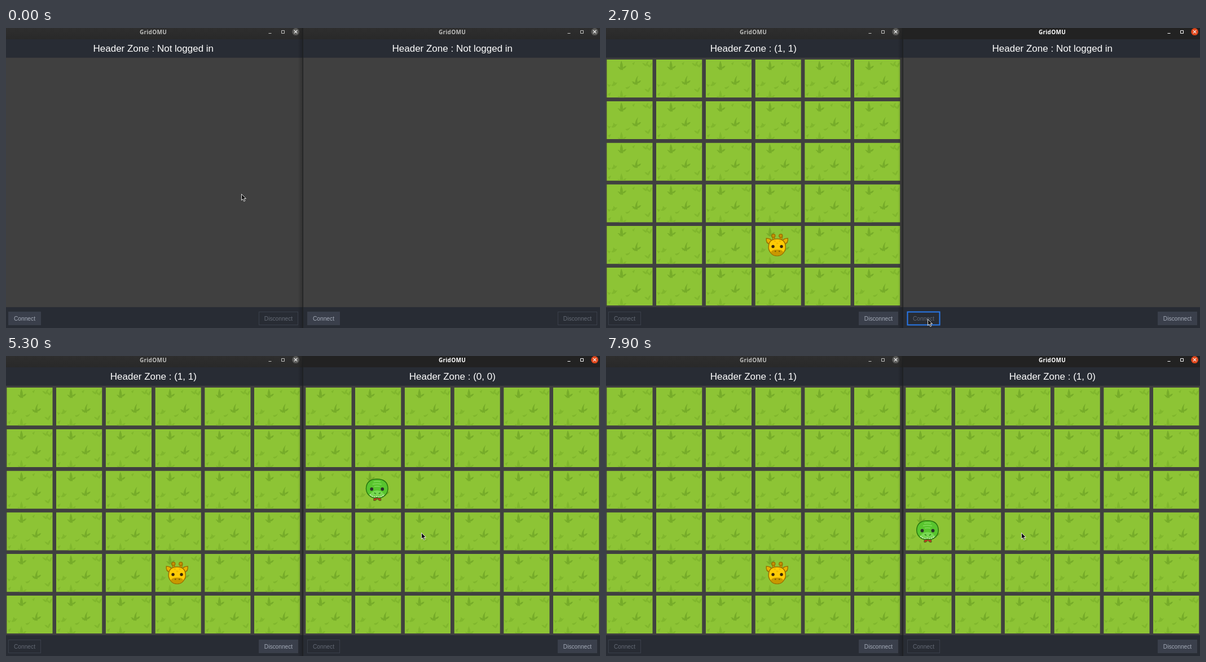
Write an HTML page that moves like this. It is 1053x532 px and loops after 8000 ms.

```html
<!DOCTYPE html>
<html lang="en">
<head>
<meta charset="utf-8">
<title>Two game windows</title>
<style>
html, body { margin: 0; width: 100%; height: 100%; overflow: hidden; background: #404040; }
svg { display: block; }
text { text-anchor: middle; font-family: "Liberation Sans", Arial, sans-serif; }
.bar { fill: url(#idleBar); }
.title { font: bold 10px "Open Sans", "Noto Sans", sans-serif; letter-spacing: .3px; fill: #bcbcba; }
.ctl { fill: none; stroke: #c4c4c2; }
.close { fill: #5a5a58; }
.cross { fill: none; stroke: #eee; stroke-width: 1.3; }
.focused .bar { fill: #222; }
.focused .title { fill: #fff; }
.focused .ctl { stroke: #fff; }
.focused .close { fill: #e3481c; }
.zone { font-size: 17px; fill: #fff; }
.panel { fill: #282c34; }
.btn rect { fill: #282c34; stroke: #3a3f4a; }
.btn text { font-size: 10.2px; fill: #646a75; }
.btn.on rect { fill: #3a3f4b; }
.btn.on text { fill: #a3aab7; }
.btn.ring rect { stroke: #2878ea; stroke-width: 2; }
</style>
</head>
<body>
<svg id="stage" width="1053" height="532" viewBox="0 0 1053 532">
  <defs>
    <linearGradient id="idleBar" x2="0" y2="1">
      <stop stop-color="#2e2e2e"/><stop offset="1" stop-color="#292929"/>
    </linearGradient>
    <linearGradient id="shade">
      <stop stop-opacity="0"/><stop offset="1" stop-opacity=".22"/>
    </linearGradient>
    <path id="tuft" d="M-8 2Q-4 1-3 4Q-4-2-1-9Q2-3 2 3Q4 0 8 0Q6 5 2 5Q3 7 1 8Q0 6-2 8Q-3 5-5 6Q-4 4-8 2Z"/>
    <path id="bend" d="M-8 2Q-4 1-2 4Q-1-4 4-9Q1-2 3 3Q5 0 9 0Q7 5 3 5Q3 8 1 8Q0 6-2 8Q-3 5-6 6Q-4 4-8 2Z"/>
    <path id="blade" d="M-5-1Q0-1 1 2Q2-3 6-4Q5 2 2 5Q-2 4-5-1Z"/>
    <symbol id="tile" viewBox="0 0 81.3 67.3">
      <rect width="82" height="68" fill="#8dc435"/>
      <g fill="#80b72d">
        <use href="#blade" x="68" y="7"/>
        <use href="#blade" x="75" y="9"/>
        <use href="#blade" x="72" y="53"/>
        <use href="#tuft" x="27" y="63"/>
        <path d="M8 46Q12 43 12 38Q16 43 19 40Q17 46 11 47ZM1 43Q5 46 8 44L4 49ZM33 49Q38 50 42 46Q40 52 35 52ZM45 7L50 4L48 10ZM2 61L8 58L5 65Z"/>
      </g>
      <use href="#tuft" x="27" y="11" fill="#76ac29"/>
      <use href="#bend" x="52" y="37" fill="#76ac29"/>
    </symbol>
    <g id="giraffe" stroke="#9b7200" stroke-width="1.5">
      <path d="M15 13L13 4M26 13L28 4" stroke-width="4.5"/>
      <path d="M15 13L13 4M26 13L28 4" stroke="#d9a400" stroke-width="2"/>
      <circle cx="13.5" cy="3.5" r="3" fill="#c99300"/>
      <circle cx="26.5" cy="3.5" r="3" fill="#c99300"/>
      <path d="M7 18Q0 17 1 8Q9 8 12 14ZM33 18Q40 17 39 8Q31 8 28 14Z" fill="#e8b100"/>
      <path d="M20 9Q34 9 35 22Q36 28 31 34Q27 39 20 39Q13 39 9 34Q4 28 5 22Q6 9 20 9Z" fill="#ffcb05"/>
      <g stroke="none">
        <path d="M13 12L18 11L17 15ZM23 11L28 13L24 15ZM19 15L23 17L19 19Z" fill="#f0b800"/>
        <path d="M20 28Q30 28 31 33Q27 38.3 20 38.3Q13 38.3 9 33Q10 28 20 28Z" fill="#c99700"/>
        <circle cx="12.8" cy="22.5" r="2.7" fill="#38270a"/>
        <circle cx="27.8" cy="22.5" r="2.7" fill="#38270a"/>
        <circle cx="17" cy="31" r="1.2" fill="#7d5b00"/>
        <circle cx="24" cy="31" r="1.2" fill="#7d5b00"/>
      </g>
    </g>
    <g id="snake">
      <path d="M17 31V34L14 35V39H17L20.5 36L24 39H27V35L24 34V31Z" fill="#b83b22" stroke="#4c6d18"/>
      <path d="M20 .8Q39 1 39.3 18Q39 27 31 32Q26 35 20 33.5Q14 35 9 32Q1 27 .7 18Q1 1 20 .8Z" fill="#58c52e" stroke="#28760f" stroke-width="1.5"/>
      <path d="M14 5.5Q20 4 26 5.5M12 10Q20 8 28 10M15 14Q20 13 25 14" fill="none" stroke="#80dc59" stroke-width="1.7"/>
      <path d="M20 21Q28 21 33 28Q27 32 20 30Q13 32 7 28Q12 21 20 21Z" fill="#79d954"/>
      <path d="M7 28Q13 34 20 31.5Q27 34 33 28" fill="none" stroke="#d7f1c5" stroke-width="1.6" stroke-dasharray="3 1"/>
      <circle cx="10.5" cy="18.5" r="2.9" fill="#293229"/>
      <circle cx="29.5" cy="18.5" r="2.9" fill="#293229"/>
      <path d="M15 25L18 27M26 25L23 27" stroke="#34891b" stroke-width="1.6"/>
    </g>
  </defs>
  <rect width="1053" height="532" fill="#404040"/>
  <g id="windows"></g>
  <rect x="517" width="9" height="532" fill="url(#shade)"/>
  <rect x="525.7" width="1.2" height="532" fill="#1d1e20"/>
  <path id="cursor" d="M.5.5V11.5L3 9.2L4.8 13.4L6.8 12.5L5 8.5H8.5Z" fill="#111" stroke="#f2f2f2" stroke-width=".9"/>
</svg>
<script>
const LOOP = 8000;
const layer = document.getElementById('windows');
const cursor = document.getElementById('cursor');
const cellX = c => 87.75 * c;
const cellY = r => 73.75 * r;

// Cursor moves: first step time, steps 100 ms apart, end point
const start = [417, 294];
const moves = [
  [100, 6, 69, 516], [800, 3, 47, 512], [1500, 3, 471, 466],
  [1900, 5, 604, 516], [2400, 1, 570, 516], [2800, 6, 736, 313]
];

// Snake hops: time, column, row
const hops = [
  [2800, 4, 4], [4200, 4, 3], [4500, 4, 2], [4800, 3, 2], [5000, 2, 2],
  [5300, 1, 2], [5600, 0, 2], [6200, 0, 3], [6500, 0, 4], [6800, 0, 5],
  [7100, 0, 0], [7400, 0, 1], [7600, 0, 2], [7900, 0, 3]
];

const button = (name, x, w, label) => `<g class="btn ${name}">
  <rect x="${x}" y="503.5" width="${w}" height="23"/>
  <text x="${x + w / 2}" y="518.7">${label}</text></g>`;

function makeWindow(x, animal) {
  let tiles = '';
  for (let i = 0; i < 36; i++) {
    tiles += `<use href="#tile" x="${1.2 + cellX(i % 6)}" y="${56 + cellY(Math.floor(i / 6))}" width="81.3" height="67.3"/>`;
  }
  const g = document.createElementNS('http://www.w3.org/2000/svg', 'g');
  g.setAttribute('transform', `translate(${x})`);
  g.innerHTML = `
    <rect class="bar" x="-3" width="529" height="20"/>
    <text class="title" x="261" y="11">GridOMU</text>
    <path class="ctl" d="M465.500 9.500H470.500M488.500 4.500H493.500V9.500H488.500Z"/>
    <circle class="close" cx="513.6" cy="6.700" r="6.400"/>
    <path class="cross" d="M510.900 4L516.300 9.400M516.300 4L510.900 9.400"/>
    <rect class="panel" x="-3" y="20" width="529" height="32.700"/>
    <text class="zone" x="261.300" y="41.500"></text>
    <g class="map">${tiles}<use class="animal" href="#${animal}"/></g>
    <rect class="panel" x="-3" y="495" width="529" height="37"/>
    ${button('connect', 4.5, 57, 'Connect')}
    ${button('leave', 448.5, 69, 'Disconnect')}`;
  layer.append(g);
  const find = s => g.querySelector(s);
  return {
    root: g, zone: find('.zone'), map: find('.map'), animal: find('.animal'),
    connect: find('.connect'), leave: find('.leave')
  };
}

function update(win, s) {
  win.root.classList.toggle('focused', s.focused);
  win.zone.textContent = 'Header Zone : ' + s.zone;
  win.map.style.display = s.map ? '' : 'none';
  win.connect.classList.toggle('on', !s.joined);
  win.connect.classList.toggle('ring', s.joined && s.ring);
  win.leave.classList.toggle('on', s.joined);
  win.animal.setAttribute('transform', `translate(${20 + cellX(s.col)} ${70 + cellY(s.row)})`);
}

function cursorAt(t) {
  let [x, y] = start;
  for (const [from, steps, toX, toY] of moves) {
    if (t < from) break;
    const k = Math.min(1, (Math.floor((t - from) / 100) + 1) / steps);
    const e = k * k * (3 - 2 * k);
    x += (toX - x) * e;
    y += (toY - y) * e;
  }
  return [x, y];
}

const left = makeWindow(0, 'giraffe');
const right = makeWindow(530, 'snake');

function draw(t) {
  update(left, {
    focused: t >= 1100 && t < 2700,
    joined: t >= 1100, ring: t < 1200, map: t >= 1200,
    zone: t < 1200 ? 'Not logged in' : '(1, 1)',
    col: 3, row: 4
  });
  const [, col, row] = hops.filter(h => h[0] <= t).pop() || hops[0];
  update(right, {
    focused: t >= 2700,
    joined: t >= 2700, ring: t < 2800,
    map: t >= 2800 && !(t >= 7000 && t < 7100),
    zone: t < 2800 ? 'Not logged in' : t < 7100 ? '(0, 0)' : '(1, 0)',
    col, row
  });
  cursor.setAttribute('transform', `translate(${cursorAt(t)})`);
}

function tick() {
  draw(performance.now() % LOOP);
  requestAnimationFrame(tick);
}
tick();
</script>
</body>
</html>
```
